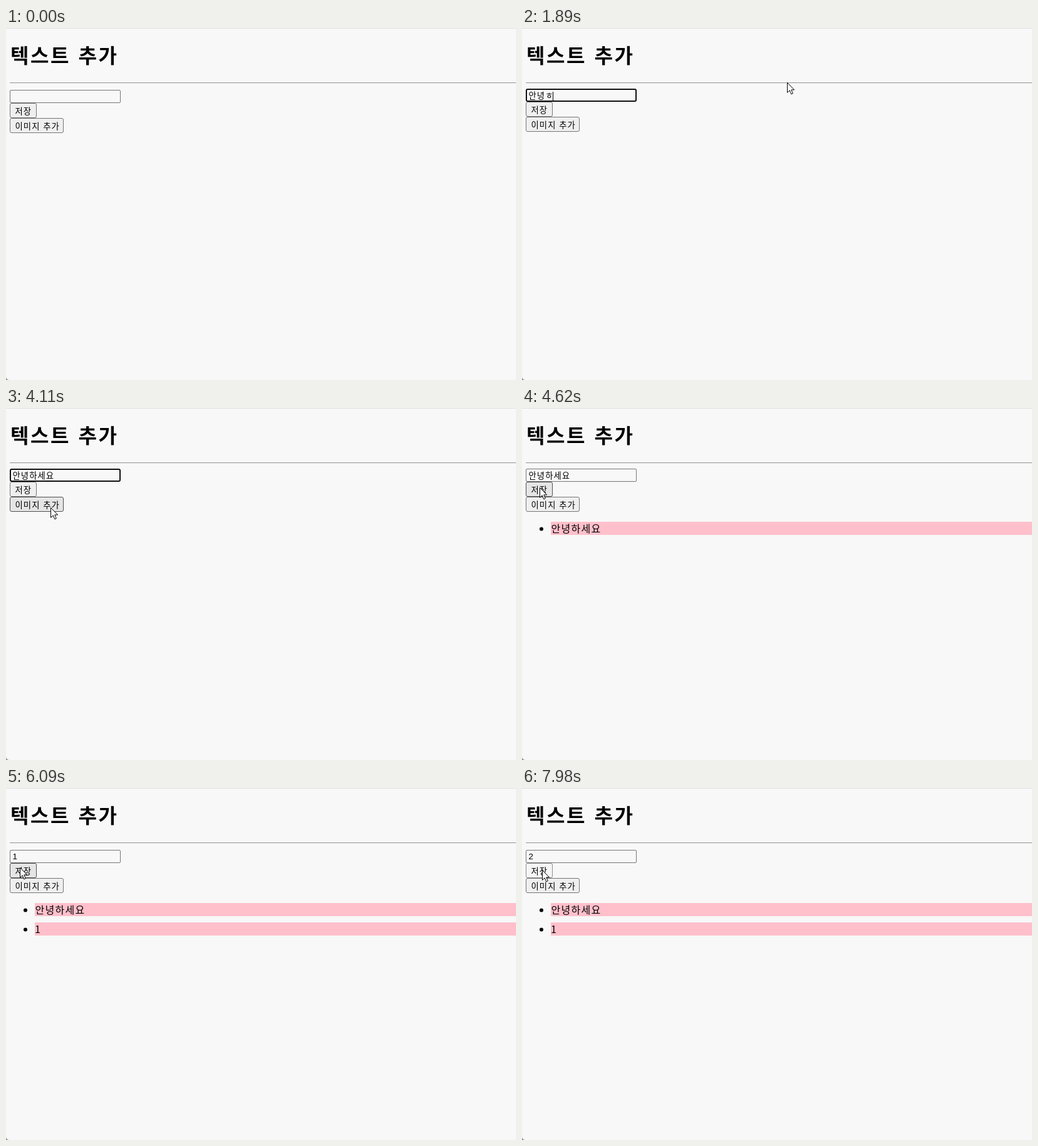
An HTML page that plays this animation: 814x563 px, repeating every 8000 ms.

```html
<!DOCTYPE html>
<html lang="ko">
<head>
<meta charset="utf-8">
<title>텍스트 추가</title>
<style>
  html, body { margin: 0; width: 100%; height: 100%; overflow: hidden; background: #f8f8f8; }
  svg { display: block; }
  text { font: 300 16px "Noto Sans CJK KR", "Noto Sans CJK", sans-serif; letter-spacing: .08em; white-space: pre; }
  .title { font-size: 32px; font-weight: 700; word-spacing: 1px; }
  .ui { font-family: "Liberation Sans", "Noto Sans CJK KR", "Noto Sans CJK", sans-serif; font-size: 13.333px; }
  .btn { fill: #efefef; stroke: #767676; }
  .btn.hover { fill: #e5e5e5; stroke: #4f4f4f; }
  .btn.active { fill: #f5f5f5; stroke: #8d8d8d; }
  .field { fill: #f8f8f8; }
  .bar { fill: #ffc0cb; }
  [hidden] { display: none; }
</style>
</head>
<body>
<svg width="814" height="563" viewBox="0 0 814 563">
  <rect width="814" height="563" fill="#f8f8f8"/>
  <rect width="814" height="1" fill="#e0e0e0"/>
  <path d="M0 558Q.5 562.5 5 563H0Z" fill="#8a8a8a"/>
  <text class="title" x="7" y="56">텍스트 추가</text>
  <rect x="6" y="87" width="808" height="1" fill="#9a9a9a"/>
  <rect x="6" y="88" width="808" height="1" fill="#eee"/>

  <g id="form">
    <rect id="blurred" class="field" x="6.5" y="97.5" width="176" height="20" rx="1.5" stroke="#767676"/>
    <rect id="focused" class="field" x="7" y="98" width="175" height="19" rx="2" stroke="#101010" stroke-width="2"/>
    <rect id="mark" y="99" height="17" fill="#3367d1"/>
    <text id="typed" class="ui" x="10.5"></text>
    <text id="marked" class="ui" y="113" fill="#fff"></text>
    <rect id="caret" width="1" height="15"/>
    <rect id="save" class="btn" x="6.5" y="118.5" width="42" height="23" rx="2.5"/>
    <text class="ui" x="14.5" y="136">저장</text>
    <rect id="image" class="btn" x="6.5" y="142.5" width="85" height="23" rx="2.5"/>
    <text class="ui" x="14.5" y="160">이미지 추가</text>
    <g id="item0">
      <circle cx="31" cy="193.5" r="3"/>
      <rect class="bar" x="46" y="182" width="768" height="21"/>
      <text x="46.5" y="199">안녕하세요</text>
    </g>
    <g id="item1">
      <circle cx="31" cy="224.5" r="3"/>
      <rect class="bar" x="46" y="213" width="768" height="21"/>
      <text x="46" y="230">1</text>
    </g>
  </g>

  <g id="pointer">
    <path id="arrow" d="M.5 .5V16.3L4.2 12.8L6.8 18.8L9.3 17.7L6.8 11.9H11.6Z" fill="#fff" stroke="#000"/>
    <path id="beam" d="M-3 -7.5H-1L.5 -6.5L2 -7.5H4M.5 -6.5V7.5M-3 8.5H-1L.5 7.5L2 8.5H4" fill="none" stroke="#000"/>
    <g id="deny" stroke="#d0021b" stroke-width="2.4">
      <circle r="6.8" fill="#fff"/>
      <path d="M-4.8 -4.8L4.8 4.8"/>
    </g>
  </g>
</svg>
<script>
const LOOP = 8000, TICK = 30, EM = 13.333, PRESS = 90;
const LEADS = 'ㄱㄲㄴㄷㄸㄹㅁㅂㅃㅅㅆㅇㅈㅉㅊㅋㅌㅍㅎ';
const $ = id => document.getElementById(id);
const show = (id, on) => $(id).toggleAttribute('hidden', !on);
const set = (id, attrs) => Object.entries(attrs).forEach(([k, v]) => $(id).setAttribute(k, v));

// How a syllable builds up in the input method: ㄴ, 녀, 녕
function strokes(ch) {
  const code = ch.charCodeAt(0) - 0xac00;
  if (code < 0) return [ch];
  const open = String.fromCharCode(0xac00 + code - code % 28);
  return [LEADS[Math.floor(code / 588)], open, ch].slice(0, code % 28 ? 3 : 2);
}

const stages = word => [...word].flatMap((ch, i) => strokes(ch).map(s => word.slice(0, i) + s));

const typing = [{ at: 0, text: '' }];
const add = (start, gap, base, list) =>
  list.forEach((s, i) => typing.push({ at: start + i * gap, text: base + s }));
const type = (start, gap, base, word) => add(start, gap, base, stages(word));
const erase = (start, gap, base, word) =>
  add(start, gap, base, ['', ...stages(word)].reverse().slice(1));

type(690, 0, '', 'ㅇ');
add(1350, 90, '', ['아', '안']);
type(1590, 45, '안', '녕');
type(1890, 60, '안녕', '하세ㅛ');
type(2280, 30, '안녕하세ㅛ', '요');
erase(2730, 82, '안녕하', '세ㅛ요');
type(3270, 70, '안녕하', '세요');
type(5520, 0, '', '1');
erase(7050, 0, '', '1');
type(7260, 0, '', '2');

// Pointer glides: start, end, target x, y and how far the path bows downwards
const origin = [724, 59];
const glides = [
  [60, 360, 160, 108, 40], [450, 690, 423, 87, -45],
  [3840, 3960, 354, 32, -25], [3960, 4110, 71, 159, 25], [4110, 4320, 28, 127, 0],
  [4650, 4890, 98, 108, 10], [4980, 5280, 5, 115, 0], [5340, 5850, 22, 127, 0],
  [6270, 6390, 95, 104, 0], [6450, 6750, 148, 175, 0], [7440, 7920, 32, 131, 0]
];

// The field has focus from a click into it until the save button is pressed
const focusSpans = [[450, 4380], [4950, 5970], [6390, 7920]];
const drag = [4980, 5520];
const within = ([a, b], t) => t >= a && t < b;

function pointerAt(t) {
  let [x, y] = t < glides[0][0] ? [-100, -100] : origin;
  for (const [start, end, tx, ty, bow] of glides) {
    if (t < start) break;
    const left = 1 - Math.min(1, (t - start) / (end - start));
    const k = 1 - left * left;
    x += (tx - x) * k;
    y += (ty - y) * k + 2 * k * (1 - k) * bow;
  }
  return [Math.round(x), Math.round(y)];
}

// Draws the field and returns the shift of the form: Hangul text lifts it by two pixels
function drawField(t, x) {
  const { at, text } = typing.filter(s => s.at <= t).pop();
  const hangul = /[ㄱ-힣]/.test(text);
  const focus = focusSpans.find(s => within(s, t));
  const selecting = within(drag, t);
  const from = selecting
    ? Math.max(0, Math.min(text.length, Math.round((x - 10) / EM)))
    : text.length;
  const left = 10 + from * EM;

  show('blurred', !focus);
  show('focused', focus);
  $('typed').textContent = text.slice(0, from);
  $('marked').textContent = text.slice(from);
  set('typed', { y: hangul ? 113 : 112 });
  set('marked', { x: left + .5 });
  set('mark', { x: left, width: (text.length - from) * EM });

  const idle = focus ? t - Math.max(at, focus[0]) : 0;
  show('caret', focus && text && !selecting && Math.floor(idle / 500) % 2 === 0);
  set('caret', { x: hangul ? Math.floor(9.7 + text.length * EM) : 17, y: hangul ? 102 : 100 });
  return hangul ? 0 : 2;
}

function drawButton(id, x, y, pressed) {
  const { x: bx, y: by, width, height } = $(id).getBBox();
  const over = x >= bx - 1 && x <= bx + width && y >= by - 1 && y <= by + height;
  $(id).setAttribute('class', 'btn' + (over ? (pressed ? ' active' : ' hover') : ''));
}

function render(t) {
  const [x, y] = pointerAt(t);
  const shift = drawField(t, x);
  const pressed = focusSpans.some(([, blur]) => within([blur, blur + PRESS], t));
  set('form', { transform: `translate(0 ${shift})` });
  for (const id of ['save', 'image']) drawButton(id, x, y - shift, pressed);
  for (const i of [0, 1]) show('item' + i, t >= focusSpans[i][1] + PRESS);

  const deny = within(drag, t) && x < 9;
  const beam = !deny && x >= 6 && x < 183 && y >= 97 + shift && y < 118 + shift;
  set('pointer', { transform: `translate(${x} ${y})` });
  show('deny', deny);
  show('beam', beam);
  show('arrow', !deny && !beam);
}

function frame(now) {
  render(Math.floor((now % LOOP) / TICK) * TICK);
  requestAnimationFrame(frame);
}
render(0);
requestAnimationFrame(frame);
</script>
</body>
</html>
```
